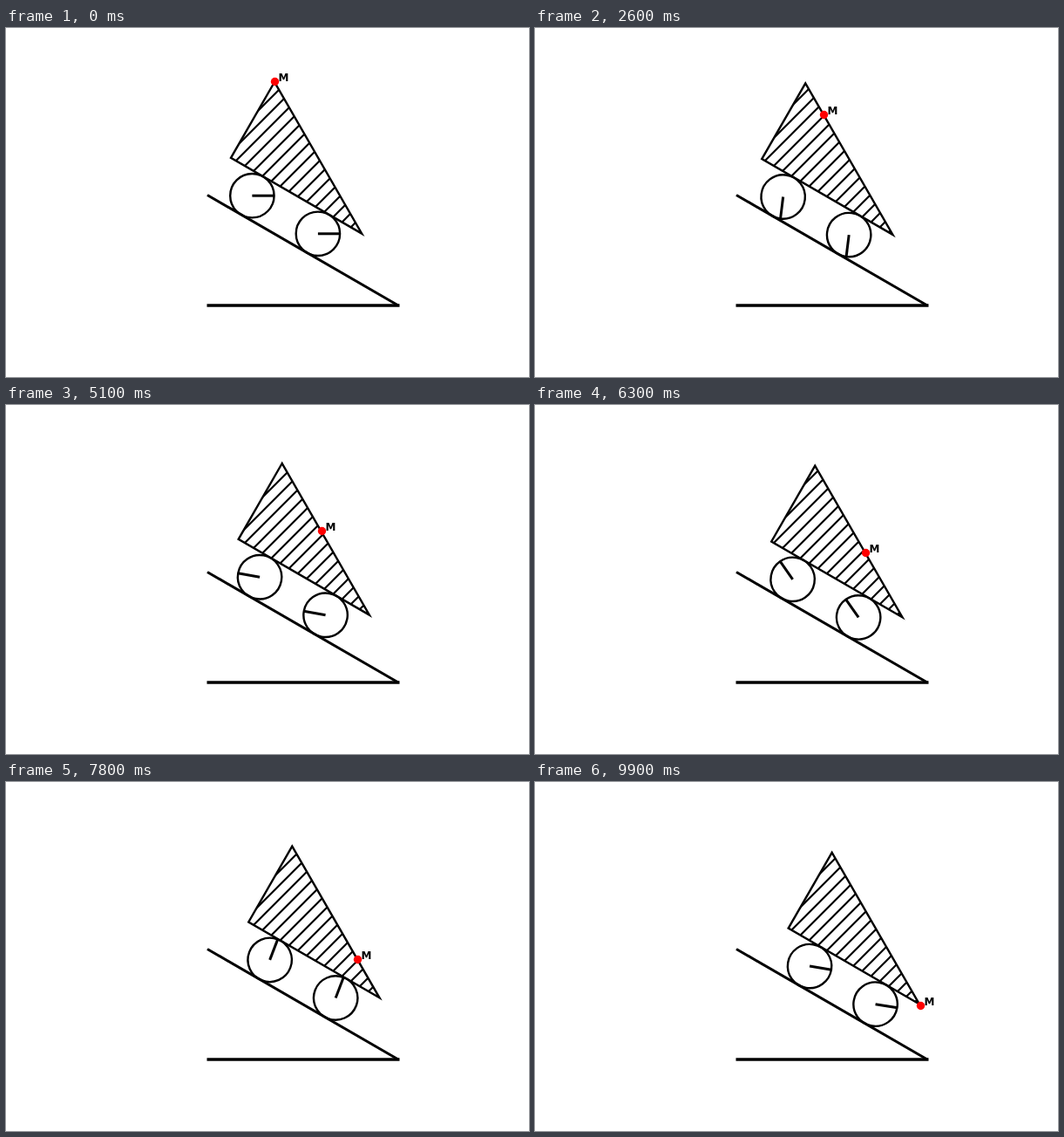
An HTML page for the animation above (10 s loop, 600 by 400 pixels).

```html
<!DOCTYPE html>
<html lang="en">
<head>
<meta charset="utf-8">
<title>Cart on an incline</title>
<style>
html, body { margin: 0; width: 100%; height: 100%; overflow: hidden; background: #fff; }
svg { display: block; }
text { font: bold 12px "DejaVu Sans", sans-serif; }
</style>
</head>
<body>
<svg width="600" height="400" viewBox="0 0 600 400" fill="none" stroke="#000" stroke-width="2.4">
  <defs>
    <pattern id="hatch" width="16" height="16" patternUnits="userSpaceOnUse">
      <path d="M-4 4L4 -4M-4 20L20 -4M12 20L20 12" stroke-width="2.2"/>
    </pattern>
  </defs>
  <path d="M231 191.5L450 318" stroke-width="3"/>
  <path d="M230.5 318H451.5" stroke-width="3.6"/>
  <path id="wedge" fill="url(#hatch)"/>
  <g class="wheel"><circle r="25.2"/><path d="M0 0H25.5" stroke-width="3"/></g>
  <g class="wheel"><circle r="25.2"/><path d="M0 0H25.5" stroke-width="3"/></g>
  <g id="mass" stroke="none">
    <circle r="4.7" fill="#f00"/>
    <text x="4" y="-.5" fill="#000">M</text>
  </g>
</svg>
<script>
const LOOP = 10000, STEP = 100;
const SLOPE = Math.tan(Math.PI / 6), STEEP = Math.tan(Math.PI / 3);
const SPIN = 37.3;
const wedge = document.getElementById("wedge");
const mass = document.getElementById("mass");
const wheels = document.querySelectorAll(".wheel");

function draw(ms) {
  const t = Math.floor(ms % LOOP / STEP) * STEP / 1000;
  const dx = t * t / 3, dy = dx * SLOPE;
  const x = 308 + dx, y = 62 + dy;

  // The hatching stays fixed to the stage while the wedge slides.
  wedge.setAttribute("d", `M${x} ${y}L${x - 50} ${y + 86.8}L${x + 100.2} ${y + 173.6}Z`);

  wheels.forEach((wheel, i) => {
    const cx = 282.4 + dx + i * 75.5, cy = 192.2 + dy + i * 75.5 * SLOPE;
    wheel.setAttribute("transform", `translate(${cx} ${cy}) rotate(${SPIN * t})`);
  });

  const run = 7.33 * t + 0.295 * t * t;
  const mx = Math.floor(x + 0.4 + run) + 0.5;
  const my = Math.floor(y - 0.2 + run * STEEP) + 0.5;
  mass.setAttribute("transform", `translate(${mx} ${my})`);
}

const start = performance.now();
function tick() {
  draw(performance.now() - start);
  requestAnimationFrame(tick);
}
draw(0);
requestAnimationFrame(tick);
</script>
</body>
</html>
```
